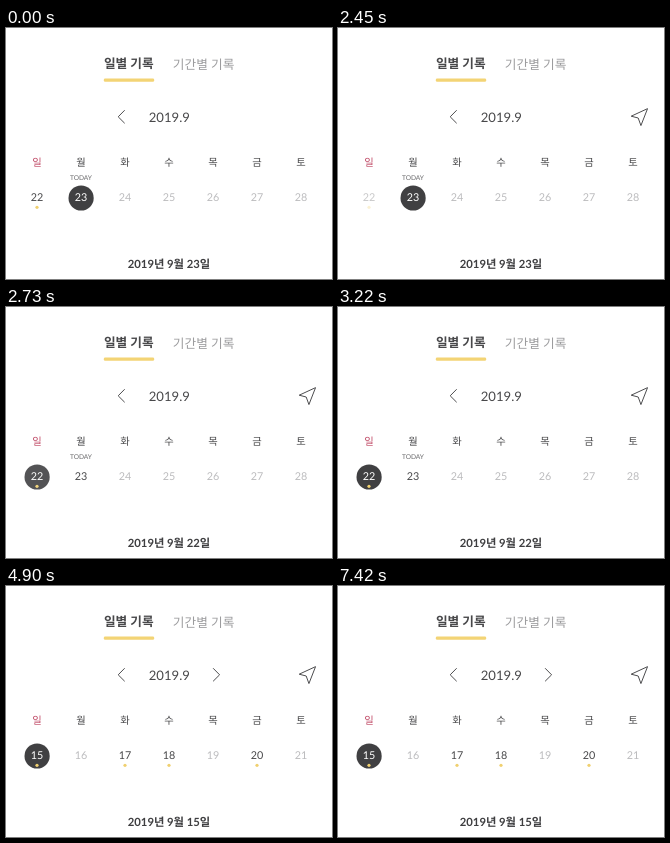
These frames come from a looping animation (326 by 251 pixels, 8000 ms). An HTML page:

```html
<!DOCTYPE html>
<html lang="ko">
<head>
<meta charset="utf-8">
<title>일별 기록</title>
<style>
html, body { margin: 0; width: 100%; height: 100%; overflow: hidden; background: #fff; }
svg { display: block; width: 100%; height: 100%; }
text { font-family: Lato, "Noto Sans CJK KR", "Noto Sans CJK", sans-serif; text-anchor: middle; fill: #48484a; text-rendering: geometricPrecision; }
.tab { font-size: 12.7px; }
.tab.idle { fill: #9c9c9e; }
.month { font-size: 13.1px; }
.week text { font-size: 10.3px; }
.day { font-size: 10.8px; }
.today { font-size: 6.6px; fill: #6a6a6c; }
.date { font-size: 11.3px; fill: #3e3e40; }
.bold { font-weight: 700; }
.day.off { fill: #bcbcbe; }
.day.on { fill: #fff; }
.week .sun { fill: #c04c68; }
.disc { fill: #404042; }
.dot { fill: #f0d070; }
.line { fill: none; stroke: #4c4c4e; stroke-width: 1; stroke-linejoin: round; stroke-linecap: round; }

.locate, .first, .second, .third { animation: 8s step-end infinite; }
.locate { animation-name: locate; }
.first { animation-name: first; }
.second { animation-name: second; }
.third { animation-name: third; }
.press-day { animation: press-day 8s linear infinite; }
.press-prev { animation: press-prev 8s linear infinite; }

@keyframes locate { 0% { opacity: 0; } .875%, 100% { opacity: 1; } }
@keyframes first { 0% { visibility: visible; } 33.25%, 100% { visibility: hidden; } }
@keyframes second { 0% { visibility: hidden; } 33.25% { visibility: visible; } 58.625%, 100% { visibility: hidden; } }
@keyframes third { 0% { visibility: hidden; } 58.625%, 100% { visibility: visible; } }
@keyframes press-day {
  0%, 30.62% { opacity: 1; }
  30.625%, 32.3% { opacity: .3; }
  33.25% { opacity: .6; }
  34.125% { opacity: .9; }
  35.875%, 100% { opacity: 1; }
}
@keyframes press-prev {
  0%, 56.8% { opacity: 1; }
  56.875% { opacity: .5; }
  57.75%, 58.6% { opacity: .2; }
  61.25%, 100% { opacity: 1; }
}
</style>
</head>
<body>
<svg viewBox="0 0 326 251">
  <text class="tab bold" x="122.8" y="39.8">일별 기록</text>
  <text class="tab idle" x="197.6" y="41">기간별 기록</text>
  <rect x="97.8" y="50.4" width="50.4" height="3.4" rx="1.4" fill="#f3d475"/>

  <path class="line press-prev" d="M118.4 82.5 L112.2 88.8 L118.4 95"/>
  <text class="month" x="163.3" y="93.9">2019.9</text>
  <path class="line third" d="M207.4 82.5 L213.6 88.8 L207.4 95"/>
  <path class="line locate" d="M309.2 80.8 L293.2 88.2 L300.2 90 L302.8 97.2 Z"/>

  <g class="week">
    <text class="sun" x="31" y="137.8">일</text>
    <text x="75" y="137.8">월</text>
    <text x="119" y="137.8">화</text>
    <text x="163" y="137.8">수</text>
    <text x="207" y="137.8">목</text>
    <text x="251" y="137.8">금</text>
    <text x="295" y="137.8">토</text>
  </g>

  <g class="press-day">
    <g class="first">
      <text class="day" x="31" y="173.2">22</text>
      <circle class="dot" cx="31" cy="179.3" r="1.6"/>
    </g>
    <g class="second">
      <circle class="disc" cx="31.1" cy="170" r="12.6"/>
      <text class="day on" x="31" y="173.2">22</text>
      <circle class="dot" cx="31" cy="179.3" r="1.6"/>
    </g>
  </g>

  <g class="first">
    <text class="today" x="75" y="151.6">TODAY</text>
    <circle class="disc" cx="75.1" cy="170" r="12.6"/>
    <text class="day on" x="75" y="173.2">23</text>
    <g class="rest"></g>
    <text class="date bold" x="163" y="240.2">2019년 9월 23일</text>
  </g>
  <g class="second">
    <text class="today" x="75" y="151.6">TODAY</text>
    <text class="day" x="75" y="173.2">23</text>
    <g class="rest"></g>
    <text class="date bold" x="163" y="240.2">2019년 9월 22일</text>
  </g>
  <g class="third">
    <circle class="disc" cx="31.1" cy="170" r="12.6"/>
    <text class="day on" x="31" y="173.2">15</text>
    <circle class="dot" cx="31" cy="179.3" r="1.6"/>
    <g class="past"></g>
    <text class="date bold" x="163" y="240.2">2019년 9월 15일</text>
  </g>
</svg>
<script>
const logged = [17, 18, 20];

function dayCell(day, column) {
  const x = 31 + 44 * column;
  const has = logged.includes(day);
  return `<text class="day ${has ? '' : 'off'}" x="${x}" y="173.2">${day}</text>` +
    (has ? `<circle class="dot" cx="${x}" cy="179.3" r="1.6"/>` : '');
}

function fill(selector, sunday, from) {
  let cells = '';
  for (let c = from; c < 7; c++) cells += dayCell(sunday + c, c);
  document.querySelectorAll(selector).forEach(g => { g.innerHTML = cells; });
}

fill('.rest', 22, 2);
fill('.past', 15, 1);
</script>
</body>
</html>
```
